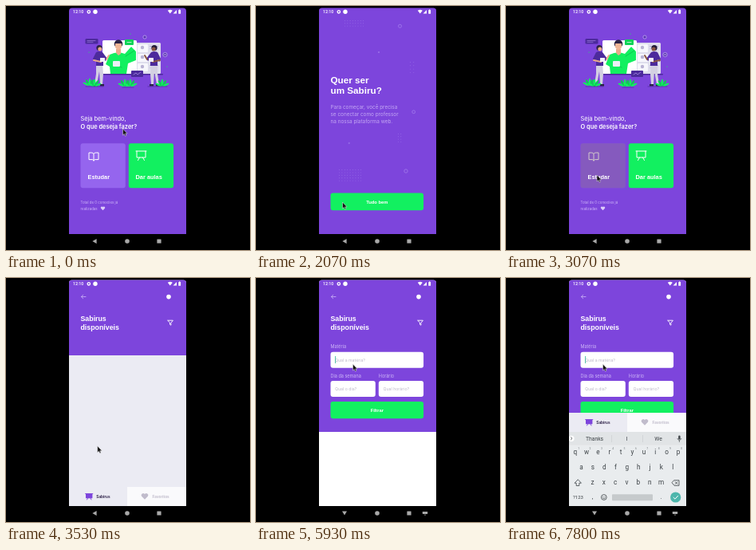
These frames come from a looping animation (306 by 306 pixels, 8000 ms). An HTML page:

```html
<!DOCTYPE html>
<html lang="pt">
<head>
<meta charset="utf-8">
<title>App de aulas</title>
<style>
  html, body { margin: 0; width: 100%; height: 100%; overflow: hidden; background: #000; }
  svg { display: block; width: 100vw; height: 100vh; }
  .body { font-family: Inter, sans-serif; }
  .bold { font-family: "Liberation Sans", Arial, sans-serif; font-weight: 700; }
  .sys { font-family: Roboto, sans-serif; }
  .mid { text-anchor: middle; }
</style>
</head>
<body>
<svg id="stage" viewBox="0 0 306 306"></svg>
<script>
const LOOP = 8000, TICK = 1000 / 15;
const TOP = 2.5, HEIGHT = 283.5, SLIDE = 212;
const PURPLE = '#7d45dc', DARK = '#4c2a9c', GREEN = '#12f060', LILAC = '#cdb5f7', PALE = '#ebebf3';

const rect = (x, y, w, h, fill, r = 0, more = '') =>
  `<rect x="${x}" y="${y}" width="${w}" height="${h}" rx="${r}" fill="${fill}" ${more}/>`;
const dot = (x, y, r, fill, more = '') => `<circle cx="${x}" cy="${y}" r="${r}" fill="${fill}" ${more}/>`;
const text = (x, y, size, str, fill = '#fff', cls = 'body', more = '') =>
  `<text x="${x}" y="${y}" font-size="${size}" fill="${fill}" class="${cls}" ${more}>${str}</text>`;
const fill = (d, color) => `<path d="${d}" fill="${color}"/>`;
const line = (d, color = '#fff', w = 1) =>
  `<path d="${d}" fill="none" stroke="${color}" stroke-width="${w}" stroke-linecap="round" stroke-linejoin="round"/>`;
const group = (id, inner, more = '') => `<g id="${id}" ${more}>${inner}</g>`;
const heart = (x, y, s, color) =>
  `<path transform="translate(${x} ${y}) scale(${s})" d="M0 3.6L-3.4 .2A2 2 0 0 1 0-2.2A2 2 0 0 1 3.4 .2Z" fill="${color}"/>`;

function dots(x, y, cols, rows, step) {
  let s = '';
  for (let i = 0; i < cols * rows; i++)
    s += dot(x + (i % cols) * step, y + Math.floor(i / cols) * step, .45, '#a27cec');
  return s;
}

function plant(x, y) {
  return [-65, -32, 0, 32, 65].map(a =>
    `<ellipse cx="${x}" cy="${y - 5}" rx="1.3" ry="4.2" fill="${a % 65 ? '#0fc956' : GREEN}" transform="rotate(${a} ${x} ${y})"/>`).join('');
}

function person(x, hair, skin, flip) {
  return `<g transform="translate(${x} 0) scale(${flip} 1)">` +
    fill('M-4 73H4L5 85 4 98H1L0 82-3 98H-6L-4 85Z', '#d3cfe2') +
    fill('M-7 98H-2V100.5H-7ZM1 98H6V100.5H1Z', '#2a2245') +
    fill('M-4 58Q0 56 4 58L10 66 8 69 5 66V75H-4V67L-7 70-8 66Z', DARK) +
    line('M9 67L12 62M-7 68L2 70', skin, 2) +
    rect(1, 65, 6, 5, '#f2f0fa', .5) +
    dot(0, 52.5, 3.6, hair) + dot(.8, 54, 2.5, skin) + '</g>';
}

const art =
  rect(162, 46, 32, 39, '#dfdeed', 1.5) +
  [48, 60, 72].map(y => rect(165, y, 13, 10, '#f7f7fc', 1) + dot(171, y + 4, 2.2, '#b9b3d4') +
    rect(180, y + 2, 11, 1.2, '#b9b3d4') + rect(180, y + 5, 8, 1.2, '#c8c4dd')).join('') +
  rect(121, 43, 43, 42, '#fff', 1.5) +
  fill('M125 73L130 61Q140 56 149 60L157 51 163 57V68L153 72 151 85H131L130 76Z', GREEN) +
  line('M134 71L145 77M150 63L161 56', '#0bbf4b', .8) +
  fill('M138 54H144V60L141 62 138 59Z', '#e9a98a') +
  dot(141, 47.5, 5.2, '#2a2245') + fill('M137 47H145V52Q141 58 137 52Z', '#f0b595') +
  rect(134, 69, 9, 7, '#eeeef7', 1) +
  rect(119, 85, 78, 1.5, DARK, .7) +
  rect(99.5, 41, 16, 6.5, DARK, 1.3) + line('M102 43.5H112M102 45.3H109', '#a98aea', .6) +
  rect(149, 42, 11, 7, '#0fd456', 1) + line('M152 45.5H157', '#fff', .7) +
  rect(157, 81, 15, 8, DARK, 1) + line('M160 86L163 84 165 86 169 83', '#b69cf0', .7) +
  dot(174, 39, 2.1, '#5a35b5', 'stroke="#d8caf8" stroke-width=".6"') +
  dot(199.5, 61, 2.7, '#5a35b5', 'stroke="#d8caf8" stroke-width=".6"') + line('M198.4 61H200.6', '#fff', .6) +
  dot(156, 35, .6, GREEN) + dot(104, 58, .6, GREEN) + dot(202, 76, .6, GREEN) +
  person(117, '#2a2245', '#e9a98a', 1) + person(186, '#211a38', '#8a5743', -1) +
  plant(105, 100) + plant(111, 101) + plant(149, 101) + plant(156, 101) + plant(196, 101) +
  line('M100 101H122M146 102H160M178 101H202', DARK, .7);

const home = rect(79, 2, 147, 300, PURPLE) + art +
  text(93.5, 143.6, 7.4, 'Seja bem-vindo,') +
  text(93.5, 153.9, 7.4, 'O que deseja fazer?', '#fff', 'body', 'font-weight="600"') +
  rect(93.5, 172.3, 56.3, 56, '#9565ee', 3) + rect(153.8, 172.3, 56.3, 56, GREEN, 3) +
  line('M110 185.5Q109.5 184 107.5 184H104V192.6H108.3Q110 192.8 110 194.2Q110 192.8 111.7 192.6H116V184H112.5Q110.5 184 110 185.5V194') +
  line('M163 182H176M164 182V190H175V182M167.5 190L165.5 193.5M171.5 190L173.5 193.5') +
  rect(93.5, 172.3, 56.3, 56, '#5a3c3c', 3, 'id="pressA" opacity="0"') +
  rect(153.8, 172.3, 56.3, 56, '#5a3c3c', 3, 'id="pressB" opacity="0"') +
  text(102.5, 217, 7.4, 'Estudar', '#fff', 'bold') + text(162.5, 217, 7.4, 'Dar aulas', '#fff', 'bold') +
  text(93.5, 248, 4.4, 'Total de 0 conexões já', LILAC) +
  text(93.5, 255.6, 4.4, 'realizadas', LILAC) + heart(121.5, 253.7, .72, '#dccdf9');

const ring = (x, y, r) => dot(x, y, r, 'none', 'stroke="#a27cec" stroke-width=".8"');
const join = rect(79, 2, 147, 300, PURPLE) +
  dots(111.5, 18.5, 8, 3, 3.3) + dots(193.5, 70.5, 2, 4, 4.3) + dots(178.5, 160.5, 2, 4, 3.3) +
  dots(104.5, 205.5, 9, 5, 3.4) +
  ring(180.5, 25.2, 2) + ring(197.7, 132.8, 1.9) + ring(188, 207, 2.2) + ring(154, 58, .7) +
  line('M116 172H117.6M116.8 171.2V172.8', '#a27cec', .6) +
  text(93.5, 97.3, 11.7, 'Quer ser', '#fff', 'bold') + text(93.5, 110, 11.7, 'um Sabiru?', '#fff', 'bold') +
  ['Para começar, você precisa', 'se conectar como professor', 'na nossa plataforma web.']
    .map((s, i) => text(93.5, 128.7 + i * 9.2, 6.4, s, '#c3a6f3')).join('') +
  rect(93.5, 234.6, 116.6, 21.6, GREEN, 3) +
  text(151.8, 247.5, 5.8, 'Tudo bem', '#fff', 'bold mid');

const HINT = '#bdb8c9';
const form =
  text(93.5, 88.2, 5.5, 'Matéria', LILAC) + text(93.5, 124.6, 5.5, 'Dia da semana', LILAC) +
  text(153.8, 124.6, 5.5, 'Horário', LILAC) +
  rect(93.5, 92.8, 116.6, 20, '#fff', 3) + rect(93.5, 129, 56.3, 20, '#fff', 3) + rect(153.8, 129, 56.3, 20, '#fff', 3) +
  text(99, 104.7, 5.2, 'Qual a matéria?', HINT) + text(99, 141, 5.2, 'Qual o dia?', HINT) +
  text(159.5, 141, 5.2, 'Qual horário?', HINT) +
  rect(99, 98, .7, 9, '#14a888', 0, 'id="caret"') +
  rect(93.5, 155, 116.6, 21.3, GREEN, 3) + text(151.8, 167.8, 5.7, 'Filtrar', '#fff', 'bold mid');

const tabs = rect(79, 262, 73, 24.5, PALE) + rect(152, 262, 74, 24.5, '#fafafc') +
  rect(100, 270.5, 8.4, 5.8, PURPLE, .6) + line('M99.6 270.5H108.8M102.5 276.3L101.5 278M106 276.3L107 278', PURPLE, .9) +
  text(113.3, 275.8, 4.7, 'Sabirus', '#32264d', 'bold') +
  heart(174, 273.6, 1.15, '#c1bccc') + text(183.5, 275.8, 4.7, 'Favoritos', '#c1bccc', 'bold');

const list = rect(79, 2, 147, 300, PALE) + rect(79, 2, 147, 95, PURPLE, 0, 'id="head"') +
  line('M94.5 23.5H100M96.7 21.2L94.4 23.5 96.7 25.8', LILAC, .8) + dot(204, 23.6, 2.8, '#fff') +
  text(93.5, 53.5, 8.8, 'Sabirus', '#fff', 'bold') + text(93.5, 64.7, 8.8, 'disponíveis', '#fff', 'bold') +
  line('M203 53.2H209.4L206.9 56.3V59.2L205.5 58.3V56.3Z', '#fff', .9) +
  group('form', form) + rect(79, 193, 147, 100, '#fff', 0, 'id="blank"') + group('tabs', tabs);

const INK = '#3c4246';
const key = (x, y, s, size = 8.2) => text(x, y, size, s, INK, 'sys mid');
const row = (keys, x, y) => [...keys].map((k, i) => key(x + i * 14.35, y, k)).join('');
const board = rect(79, 193, 147, 94, '#e9ecee') + rect(79, 193, 147, 16.5, '#e1e4e6') +
  dot(82, 201.3, 3.6, '#fff') + line('M81.4 199.7L83 201.3 81.4 202.9', INK, .8) +
  key(111, 203.7, 'Thanks', 6.8) + key(151.5, 203.7, 'I', 6.8) + key(191, 203.7, 'We', 6.8) +
  rect(132, 197, .5, 9, '#c3c7ca') + rect(171, 197, .5, 9, '#c3c7ca') +
  rect(216.2, 197.5, 2.4, 5, INK, 1.2) + line('M215 201.4Q217.4 206 219.8 201.4M217.4 204V205.4', INK, .7) +
  row('qwertyuiop', 86.8, 221.4) +
  [...'1234567890'].map((n, i) => text(90.2 + i * 14.35, 215.4, 3.4, n, '#777d81', 'sys')).join('') +
  row('asdfghjkl', 94.5, 240.4) + row('zxcvbnm', 108.5, 259.4) +
  line('M90 253L86 257.2H88.2V260.5H91.8V257.2H94Z', INK, .8) +
  line('M211 253.7H217V260.3H211L208.3 257ZM212.2 255.6L215 258.4M215 255.6L212.2 258.4', INK, .8) +
  key(90.5, 277.3, '?123', 6) + key(108.5, 277, ',', 8) + key(194.5, 277, '.', 8) +
  dot(122.8, 275, 3.4, 'none', `stroke="${INK}" stroke-width=".8"`) + line('M121.2 276Q122.8 277.8 124.4 276', INK, .7) +
  dot(121.6, 274.2, .5, INK) + dot(124, 274.2, .5, INK) +
  rect(133, 271.2, 51, 8, '#c6cacc', 1) +
  dot(212.7, 275, 6.6, '#4db6ac') + line('M210 275.2L212 277.2 215.6 273.2', '#fff', 1);

const status = text(84, 9.4, 5.2, '12:10', '#fff', 'sys', 'font-weight="500"') +
  dot(103.8, 7.3, 1.7, 'none', 'stroke="#fff" stroke-width="1.3"') + dot(112, 7.3, 2.7, '#fff') +
  fill('M202.8 5.8Q205.8 3.6 208.8 5.8L205.8 9.6Z', '#fff') + fill('M209.6 9.6H214V5Z', '#fff') +
  rect(216.3, 4.9, 2.8, 4.9, '#fff', .4) + rect(217.1, 4.3, 1.2, .8, '#fff');

const GREY = '#a9a9a9';
const nav = group('back', fill('M108.4 295L113.6 292V298Z', GREY)) + dot(152, 295, 2.8, GREY) + rect(189.4, 292.4, 5.2, 5.2, GREY, .4) +
  group('keys', rect(208.8, 293, 6.4, 3, GREY, .4) + fill('M210.8 296.7H213.2L212 298Z', GREY));

document.getElementById('stage').innerHTML =
  `<defs><clipPath id="phone"><path d="M79 286V6.5Q79 2.5 83 2.5H222Q226 2.5 226 6.5V286Z"/></clipPath>
   <clipPath id="reveal"><rect id="edge" x="79" y="2.5" width="147" height="300"/></clipPath></defs>` +
  rect(0, 0, 306, 306, '#000') +
  group('screen',
    group('home', home) + rect(79, 2, 147, 300, '#000', 0, 'id="shade"') +
    group('card', group('page', group('join', join) + group('list', list)), 'clip-path="url(#reveal)"') +
    group('board', board) + status, 'clip-path="url(#phone)"') +
  nav +
  group('cursor', '<path d="M0 0V8L1.8 6.4 3 9.1 4.4 8.5 3.2 5.9H5.6Z" fill="#111" stroke="#e8e8e8" stroke-width=".5"/>');

const el = {};
document.querySelectorAll('[id]').forEach(n => el[n.id] = n);
const show = (n, on) => n.setAttribute('visibility', on ? 'inherit' : 'hidden');
const move = (n, x, y) => n.setAttribute('transform', `translate(${x} ${y})`);
const unit = v => Math.min(1, Math.max(0, v));

// cubic-bezier(.20833, .82, .25, 1)
function ease(x) {
  if (x <= 0 || x >= 1) return unit(x);
  const at = (a, b, s) => 3 * a * s * (1 - s) ** 2 + 3 * b * s * s * (1 - s) + s ** 3;
  let lo = 0, hi = 1;
  for (let i = 0; i < 24; i++) {
    const m = (lo + hi) / 2;
    if (at(.20833, .25, m) < x) lo = m; else hi = m;
  }
  return at(.82, 1, lo);
}

// time, x, y
const path = [
  [0, 146.5, 154], [450, 146.5, 154], [800, 186, 195], [1500, 186, 195], [1620, 114, 232],
  [1780, 114, 232], [1900, 108.5, 246], [2480, 108.5, 246], [2800, 114, 212], [3500, 114, 212],
  [4130, 203, 59], [4260, 203, 58], [4900, 203, 58], [5200, 121.5, 110], [5460, 121.5, 110],
  [5600, 121.5, 108], [LOOP, 121.5, 108]
];

function pointer(t) {
  const i = Math.max(1, path.findIndex(p => p[0] >= t));
  const [t0, x0, y0] = path[i - 1], [t1, x1, y1] = path[i];
  const k = unit((t - t0) / (t1 - t0)), s = k * k * (3 - 2 * k);
  return [x0 + (x1 - x0) * s, y0 + (y1 - y0) * s];
}

function progress(t) {
  if (t < 2260) return ease((t - 918) / SLIDE);
  if (t < 3110) return 1 - ease((t - 2260) / SLIDE);
  return ease((t - 3110) / SLIDE);
}

function draw(t) {
  const p = progress(t), gap = HEIGHT * (1 - p);
  el.edge.setAttribute('y', TOP + gap);
  move(el.page, 0, gap * .041);
  move(el.home, 0, -HEIGHT * .02 * p);
  el.shade.setAttribute('opacity', .1 * unit(p / .36));
  show(el.card, p > 0);
  show(el.join, t < 3110);
  show(el.list, t >= 3110);

  el.pressA.setAttribute('opacity', t < 3330 ? .27 * unit((t - 2800) / 150) : 0);
  el.pressB.setAttribute('opacity', t < 1130 ? .22 * unit((t - 780) / 120) : 0);

  const open = t >= 4530 && t >= 3110, typing = t >= 5930;
  el.head.setAttribute('height', open ? 198 : 95);
  show(el.form, open);
  show(el.blank, typing);
  show(el.tabs, t < 5930 || t >= 5990);
  move(el.tabs, 0, typing ? -93 : 0);
  const blinks = [6470, 6730, 7070, 7330, 7600, 7800].filter(b => t >= b).length;
  show(el.caret, typing && open && blinks % 2 === 0);

  show(el.board, typing);
  move(el.board, 0, 94 * (1 - ease((t - 5935) / 265)));
  el.back.setAttribute('transform', typing ? 'rotate(-90 111 295)' : '');
  show(el.keys, typing);
  move(el.cursor, ...pointer(t));
}

const start = performance.now();
function frame() {
  const t = (performance.now() - start) % LOOP;
  draw(Math.floor((t + 4) / TICK) * TICK % LOOP);
  requestAnimationFrame(frame);
}
frame();
</script>
</body>
</html>
```
